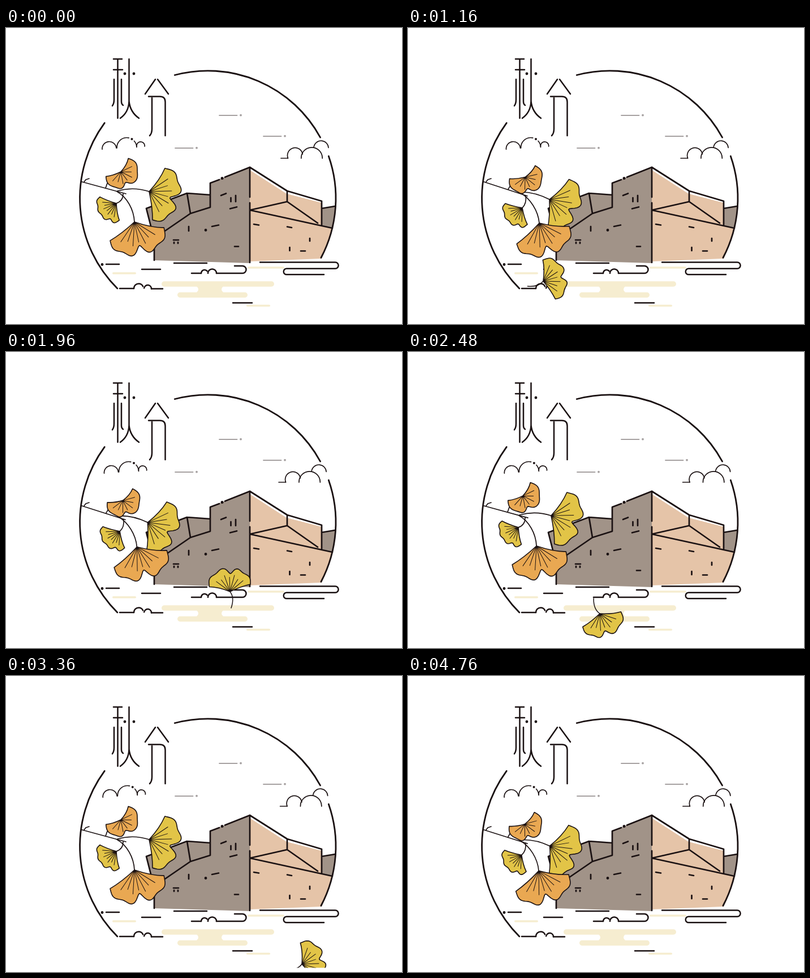
These frames come from a looping animation (700x525 px, 4800 ms). An HTML page with a canvas:

```html
<!DOCTYPE html>
<html lang="zh">
<head>
<meta charset="utf-8">
<title>秋分</title>
<style>
html, body { margin: 0; width: 100%; height: 100%; overflow: hidden; background: #fff; }
canvas { display: block; }
</style>
</head>
<body>
<canvas id="stage" width="700" height="525"></canvas>
<script>
const ctx = document.getElementById('stage').getContext('2d');
const LOOP = 4800, STEP = 40, TAU = Math.PI * 2, RAD = Math.PI / 180;
const INK = '#1a1112', BROWN = '#a19388', TAN = '#e5c4a8';
const ORANGE = '#e9a852', YELLOW = '#e2c447', CREAM = '#f6edd0', GRAY = '#a6a1a1';

const lerp = (a, b, k) => a + (b - a) * k;
const wave = (t, period, phase = 0) => (1 - Math.cos(TAU * (t / period + phase))) / 2;

function line(d, width = 2.6, color = INK) {
  ctx.lineWidth = width;
  ctx.strokeStyle = color;
  ctx.stroke(new Path2D(d));
}
function area(d, color) {
  ctx.fillStyle = color;
  ctx.fill(new Path2D(d));
}
function dot(x, y, r = 2.3, color = INK) {
  ctx.fillStyle = color;
  ctx.beginPath();
  ctx.arc(x, y, r, 0, TAU);
  ctx.fill();
}
function bar(x, y, w, h) {
  ctx.fillStyle = CREAM;
  ctx.beginPath();
  ctx.roundRect(x, y - h / 2, w, h, h / 2);
  ctx.fill();
}
function arc(x, y, r, from, to, width) {
  ctx.lineWidth = width;
  ctx.strokeStyle = INK;
  ctx.beginPath();
  ctx.arc(x, y, r, from * RAD, to * RAD);
  ctx.stroke();
}

function drawTitle() {
  line(`M190 55H205 M190 74H206 M197.5 55V160 M191 91V127Q191 134 188 138
    M204 91V130Q204 135 207 137 M217.5 55V130C217 143 212 153 202 160
    M217.5 130C219 144 225 153 235 160
    M264 91L246 117 M268 91L287 117
    M252 121.5H272Q281.5 121.5 281.5 131V191 M258 124V179Q258 187 254 191`, 2.5);
  dot(210, 81, 2.4);
  dot(226, 81, 2.4);
}

function drawWind() {
  for (const [x, y] of [[377, 155], [455, 192], [299, 213]]) {
    line(`M${x} ${y}h31.5`, 1.8, GRAY);
    dot(x + 38, y - .3, 1.9, GRAY);
  }
}

function drawClouds(t) {
  const k = wave(t, 800);
  ctx.save();
  ctx.translate(3.6 * k, 0);
  arc(182.5, 214, 12.5, 175, 355, 1.7);
  arc(213.5, 212, 17.5, 177, 282, 1.7);
  arc(213.5, 212, 17.5, 318, 358, 1.7);
  arc(238, 209, 7.2, 172, 368, 1.7);
  dot(222.5, 197, 2);
  ctx.restore();
  ctx.save();
  ctx.translate(-4 * k, 0);
  line('M486 231H498', 1.7);
  arc(511, 226, 13.5, 158, 350, 1.7);
  arc(540.5, 230.5, 18.7, 178, 362, 1.7);
  arc(557, 213, 13, 185, 357, 1.7);
  ctx.restore();
}

function drawRing() {
  for (const [from, to] of [[135, 216.2], [255, 331.5], [340.7, 387.8]])
    arc(356.8, 302, 226.2, from, to, 2.8);
}

function drawBuilding() {
  area('M248 320L320 293L361 296V275L431 247V417L262 412V375Z', BROWN);
  area('M558 320L583 316L577 355L558 350Z', BROWN);
  area('M431 252L496 294L558 310V350L577 355Q570 384 558 409L431 414Z', TAN);
  line(`M262 412V375L248 320L320 293L361 296 M320 293L326 329 M262 373L326 329L361 318V275
    L377 269 M387 264.5L431 247V300 M431 310V416 M431 247L497 289L558 307V350
    M497 289V308L431 323L577 355 M497 308L551 346 M558 320L582 316`, 2.7);
  line(`M380 297l9 -3.5 M397.5 301v7 M406 297v11 M396 320.5l12 -3 M323 352v8
    M364 352l12 -2.5 M296 376h9 M297 380v2 M304 380v2 M404 387.5h7
    M438 348l9 1.5 M497 352.5l8 1.5 M537 373v5 M501.5 389v6 M521 395.5h8`, 2.7);
  dot(382, 266.5, 2.5);
  dot(353, 358.5, 2.4);
}

function drawWater() {
  bar(275, 454, 199, 9.5);
  bar(303, 473.5, 124, 9.5);
  area('M337 458H384Q378 464 384 469H337Q343 464 337 458Z', CREAM);
  bar(188, 435, 42, 3.6);
  bar(427, 425, 65, 3.6);
  bar(425, 492.5, 42, 3.6);
  dot(170, 419.5, 2.4);
  line(`M177 419H200 M240 428H273 M297 417H355 M401 487.5H435
    M449 415.5H582A5.6 5.6 0 0 1 582 426.7H496A5.3 5.3 0 0 0 496 437.3H562
    M328 435H345 M372 435H418A6.5 6.5 0 0 0 418 422H404 M201 462H226 M257 462.5H277`, 2.5);
  arc(351, 435, 6, 180, 320, 2.5);
  arc(364.5, 435, 7.5, 180, 360, 2.5);
  arc(234.5, 462, 8.5, 180, 335, 2.5);
  arc(250.5, 462.5, 6.5, 190, 360, 2.5);
}

// A leaf is a fan around its stem: axis and half spread in degrees, notch from -1 to 1.
const twigLeaves = [
  { color: ORANGE, x: 203, y: 255, r: 31, axis: 53, half: 114, notch: .12, depth: .3, dx: 4, dy: 9.5, turn: 12 },
  { color: YELLOW, x: 253, y: 290, r: 57, axis: 15, half: 71, notch: .03, depth: .27, dx: -3, dy: 14, turn: 10 },
  { color: YELLOW, x: 195, y: 311, r: 35, axis: 142, half: 62, notch: -.5, depth: .1, dx: 7, dy: 8, turn: -7 },
  { color: ORANGE, x: 227, y: 344, r: 61, axis: 78, half: 67, notch: 0, depth: .24, dx: 5, dy: 2, turn: -5 }
];
const looseLeaf = { color: YELLOW, r: 43, half: 75, notch: .05, depth: .2 };

function drawLeaf({ color, r, half, notch, depth }, x, y, angle) {
  const rim = s => r * (.97 - depth * Math.exp(-(((s - notch) / .13) ** 2))
    - .03 * Math.cos(13 * s) - .07 * s ** 8);
  const polar = (s, d) => [d * Math.cos(s * half * RAD), d * Math.sin(s * half * RAD)];
  ctx.save();
  ctx.translate(x, y);
  ctx.rotate(angle * RAD);
  ctx.beginPath();
  ctx.moveTo(0, 0);
  ctx.quadraticCurveTo(...polar(-.88, r / 2), ...polar(-1, rim(-1)));
  for (let s = -1; s <= 1; s += .04) ctx.lineTo(...polar(s, rim(s)));
  ctx.quadraticCurveTo(...polar(.88, r / 2), 0, 0);
  ctx.closePath();
  ctx.fillStyle = color;
  ctx.fill();
  ctx.lineWidth = 1.6;
  ctx.strokeStyle = INK;
  ctx.stroke();
  ctx.beginPath();
  for (let i = -3; i <= 3; i++) {
    ctx.moveTo(0, 0);
    ctx.lineTo(...polar(i * .23, r * (i % 2 ? .7 : .6)));
  }
  ctx.lineWidth = 1;
  ctx.stroke();
  ctx.restore();
}

function drawBranch(t) {
  const k = wave(t, 840, .01) / .88;
  const by = (x, y, dx, dy) => `${x + dx * k} ${y + dy * k} `;
  const tips = twigLeaves.map(leaf => by(leaf.x, leaf.y, leaf.dx, leaf.dy));
  line('M133 272.5L' + by(212, 294, -1, 4) + 'M138 273L141 269L147 267', 1.7);
  line('M' + by(176, 284, 1, 2) + 'Q' + by(178, 276, 2, 4) + by(183, 269, 2, 6)
    + 'M' + by(197, 289, 3, 2) + 'Q' + by(225, 281, 0, 10) + tips[1]
    + 'M' + by(207, 294, 1, 3) + 'Q' + by(207, 307, 3, 4) + tips[2]
    + 'M' + by(196, 290, 2, 2) + 'C' + by(214, 300, 2, 2) + by(226, 322, 4, 2) + tips[3], 1.7);
  for (const leaf of twigLeaves)
    drawLeaf(leaf, leaf.x + leaf.dx * k, leaf.y + leaf.dy * k, leaf.axis + leaf.turn * k);
}

// The loose leaf flies along its heading at a steady speed.
const SPEED = .25;
const flight = [
  { t: 200, x: 165, y: 265, heading: 95 },
  { t: 1160, x: 239, y: 449, heading: -16 },
  { t: 1960, x: 396, y: 425, heading: -92 },
  { t: 2480, x: 339, y: 464, heading: -290 },
  { t: 3360, x: 523, y: 511, heading: -379 },
  { t: 4040, x: 686, y: 450, heading: -383 }
];

function follow(t) {
  const i = flight.findIndex(key => t < key.t), a = flight[i - 1], b = flight[i];
  const span = b.t - a.t, s = (t - a.t) / span, pull = SPEED * span;
  const ease = s * s * (3 - 2 * s), leave = s * (1 - s) ** 2, arrive = s * s * (s - 1);
  const along = (axis, trig) => lerp(a[axis], b[axis], ease)
    + pull * (leave * trig(a.heading * RAD) + arrive * trig(b.heading * RAD));
  return [along('x', Math.cos), along('y', Math.sin), lerp(a.heading, b.heading, s)];
}

function drawLooseLeaf(t) {
  if (t < flight[0].t || t >= flight.at(-1).t) return;
  const [x, y, heading] = follow(t);
  ctx.save();
  ctx.beginPath();
  ctx.rect(0, 0, 683, 517.5);
  ctx.clip();
  ctx.globalAlpha = Math.min(1, (t - 160) / 200);
  ctx.save();
  ctx.translate(x, y);
  ctx.rotate(heading * RAD);
  line('M0 0Q-11 8 -29 1', 1.5);
  ctx.restore();
  drawLeaf(looseLeaf, x, y, heading);
  ctx.restore();
}

function draw(now) {
  const t = Math.floor(now % LOOP / STEP) * STEP;
  ctx.fillStyle = '#fff';
  ctx.fillRect(0, 0, 700, 525);
  ctx.lineCap = ctx.lineJoin = 'round';
  drawTitle();
  drawWind();
  drawClouds(t);
  drawBuilding();
  drawRing();
  drawWater();
  drawBranch(t);
  drawLooseLeaf(t);
}

const start = performance.now();
function tick() {
  draw(performance.now() - start);
  requestAnimationFrame(tick);
}
tick();
</script>
</body>
</html>
```
